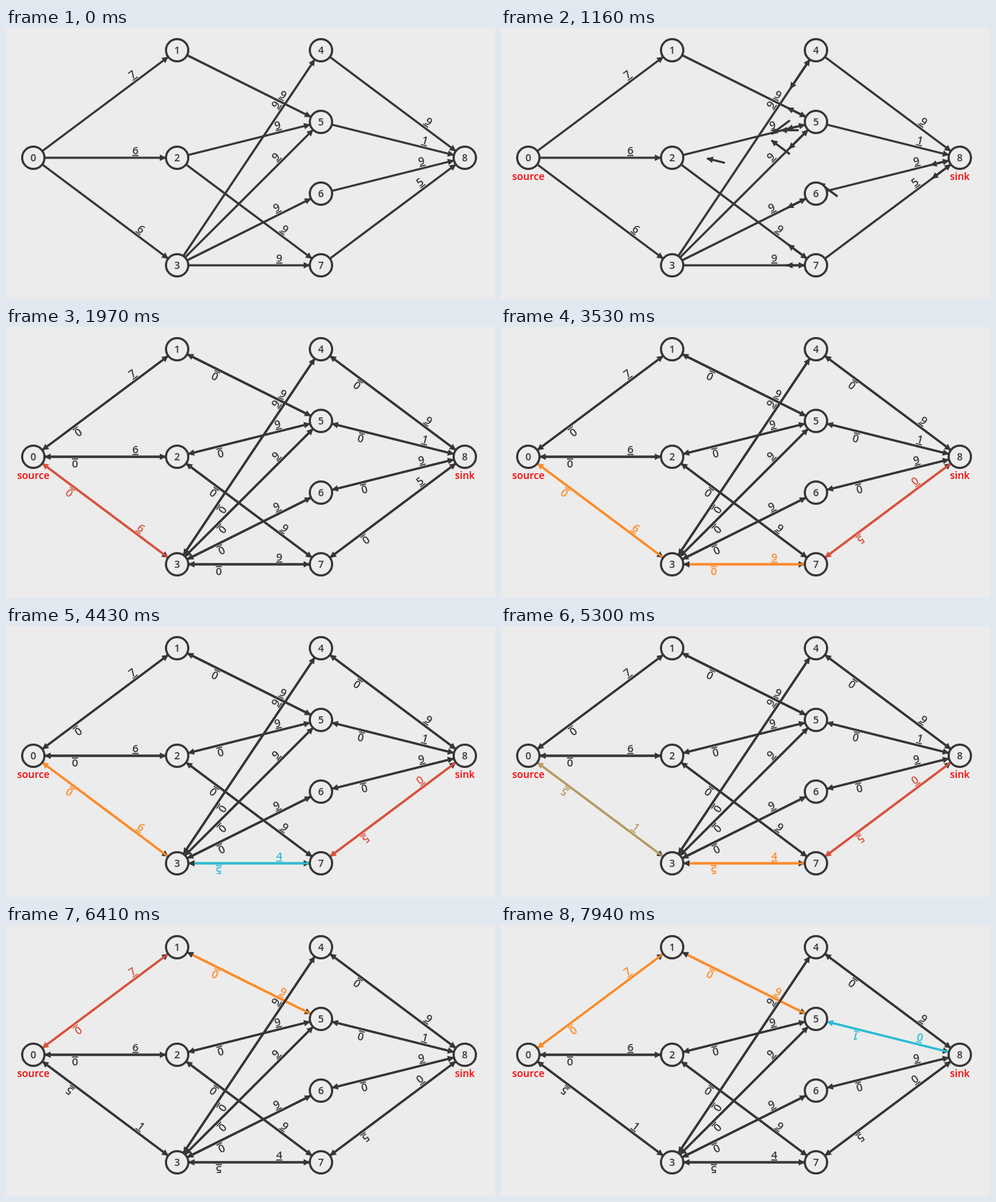
Animation of 680 by 378 pixels, one loop 8000 ms. Source, as an HTML page:

```html
<!DOCTYPE html>
<html lang="en">
<head>
<meta charset="utf-8">
<title>Maximum flow</title>
<style>
  html, body { margin: 0; width: 100%; height: 100%; overflow: hidden; background: #ececec; }
  svg { display: block; width: 680px; height: 378px; }
  text { font: 600 14px "Open Sans", "Noto Sans", sans-serif; text-anchor: middle; }
  .weight { font-size: 15px; text-decoration: underline; }
  .node { fill: #ececec; stroke: #373536; stroke-width: 3; }
  .name { fill: #373536; }
  .role { fill: #f00; }
</style>
</head>
<body>
<svg viewBox="0 0 680 378"></svg>
<script>
const LOOP = 8000, FADE = 250, RADIUS = 16;
const DARK = [55, 53, 54], RED = [217, 81, 60], ORANGE = [255, 138, 39], CYAN = [46, 187, 209];
const GROW_START = 985, GROW_TIME = 530;

const nodes = [[38, 181], [238, 31], [238, 181], [238, 331], [438, 31],
               [438, 131], [438, 231], [438, 331], [638, 181]];

// from, to, capacity; birth: where the residual arrow flies in from;
// fades: [time, colour]; flow: [time, amount]; plainHead: residual head stays dark
const edges = [
  { from: 0, to: 1, cap: 7, birth: [432, 144], fades: [[5655, RED], [6670, ORANGE]] },
  { from: 0, to: 2, cap: 6, birth: [447, 136] },
  { from: 0, to: 3, cap: 6, birth: [432, 151], flow: [4550, 5],
    fades: [[1700, RED], [2670, ORANGE], [4665, CYAN], [5162, ORANGE], [5655, DARK]] },
  { from: 1, to: 5, cap: 9, plainHead: true, fades: [[6180, ORANGE]] },
  { from: 2, to: 5, cap: 9 },
  { from: 2, to: 7, cap: 9 },
  { from: 3, to: 4, cap: 9 },
  { from: 3, to: 5, cap: 9 },
  { from: 3, to: 6, cap: 9 },
  { from: 3, to: 7, cap: 9, plainHead: true, flow: [4040, 5],
    fades: [[2165, ORANGE], [4165, CYAN], [4665, ORANGE], [5655, DARK]] },
  { from: 4, to: 8, cap: 9, birth: [441, 246] },
  { from: 5, to: 8, cap: 1, birth: [258, 190], flow: [7550, 1],
    fades: [[6670, RED], [7675, CYAN]] },
  { from: 6, to: 8, cap: 9 },
  { from: 7, to: 8, cap: 5, flow: [3530, 5],
    fades: [[2670, RED], [3665, CYAN], [4165, RED], [5655, DARK]] },
];

const svg = document.querySelector("svg");

function add(parent, tag, attrs, content = "") {
  const el = document.createElementNS("http://www.w3.org/2000/svg", tag);
  for (const key in attrs) el.setAttribute(key, attrs[key]);
  el.textContent = content;
  return parent.appendChild(el);
}

const backLayer = add(svg, "g"), frontLayer = add(svg, "g");
const labelLayer = add(svg, "g"), nodeLayer = add(svg, "g");

const mix = (a, b, k) => a.map((v, i) => v + (b[i] - v) * k);
const rgb = c => `rgb(${c.map(Math.round)})`;

function ease(p) {
  p = Math.min(1, Math.max(0, p));
  return p < .5 ? 4 * p ** 3 : 1 - 4 * (1 - p) ** 3;
}

// An arrow lies along the x axis of its own group; place() turns and moves it.
function makeArrow(layer, a, b) {
  const [x1, y1] = nodes[a], [x2, y2] = nodes[b];
  const length = Math.hypot(x2 - x1, y2 - y1);
  const group = add(layer, "g");
  const arrow = {
    group,
    start: mix(nodes[a], nodes[b], RADIUS / length),
    length: length - 2 * RADIUS,
    angle: Math.atan2(y2 - y1, x2 - x1) * 180 / Math.PI,
    line: add(group, "line", { "stroke-width": 3 }),
    head: add(group, "path", { d: "M-8.1-4.5L.9 0L-8.1 4.5Z", fill: rgb(DARK) }),
  };
  const label = add(labelLayer, "g");
  arrow.label = add(label, "text", { class: "weight", x: arrow.length * .75, y: -5 });
  label.setAttribute("transform", transform(arrow, arrow.start));
  place(arrow, arrow.start, 1);
  return arrow;
}

function transform(arrow, [x, y]) {
  return `translate(${x} ${y}) rotate(${arrow.angle})`;
}

function place(arrow, start, grown) {
  const end = arrow.length * grown;
  arrow.group.setAttribute("transform", transform(arrow, start));
  arrow.line.setAttribute("x2", end);
  arrow.head.setAttribute("transform", `translate(${end} 0)`);
}

function paint(arrow, colour, value) {
  arrow.line.setAttribute("stroke", colour);
  arrow.label.setAttribute("fill", colour);
  if (arrow.label.textContent !== String(value)) arrow.label.textContent = value;
}

function colourAt(edge, t) {
  return (edge.fades || []).reduce((c, [time, next]) => mix(c, next, ease((t - time) / FADE)), DARK);
}

for (const edge of edges) {
  edge.forward = makeArrow(backLayer, edge.from, edge.to);
  edge.residual = makeArrow(frontLayer, edge.to, edge.from);
}

nodes.forEach(([x, y], i) => {
  add(nodeLayer, "circle", { class: "node", cx: x, cy: y, r: 15.5 });
  add(nodeLayer, "text", { class: "name", x, y: y + 5 }, i);
});

const roles = add(svg, "g");
add(roles, "text", { class: "role", x: 38, y: 211.5 }, "source");
add(roles, "text", { class: "role", x: 638, y: 211.5 }, "sink");

function draw(t) {
  const grown = ease((t - GROW_START) / GROW_TIME);
  roles.style.display = t < 500 ? "none" : "";
  for (const edge of edges) {
    const { forward, residual } = edge;
    const colour = rgb(colourAt(edge, t));
    const flow = edge.flow && t >= edge.flow[0] ? edge.flow[1] : 0;
    paint(forward, colour, edge.cap - flow);
    paint(residual, colour, flow);
    if (!edge.plainHead) residual.head.setAttribute("fill", colour);
    place(residual, mix(edge.birth || residual.start, residual.start, grown), grown);
    residual.group.style.display = grown > 0 ? "" : "none";
    residual.label.style.display = grown === 1 ? "" : "none";
  }
}

function tick() {
  draw(performance.now() % LOOP);
  requestAnimationFrame(tick);
}
tick();
</script>
</body>
</html>
```
